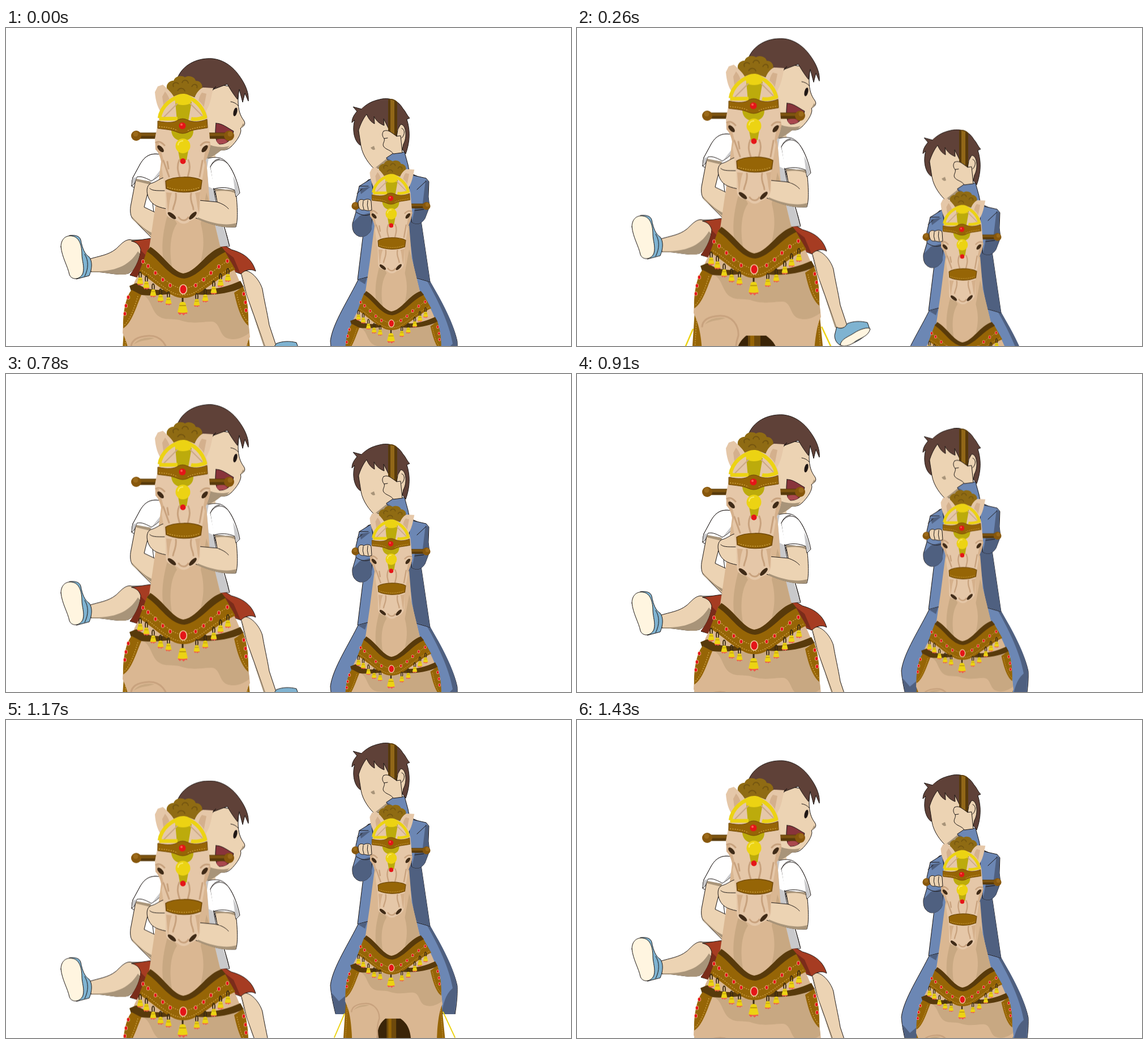
These frames come from a looping animation (998 px wide and 561 px high, 1.56 s). An HTML page:

```html
<!DOCTYPE html>
<html lang="en">
<head>
<meta charset="utf-8">
<title>Carousel</title>
<style>
html, body { margin: 0; width: 100%; height: 100%; overflow: hidden; background: #fff; }
svg { display: block; width: 998px; height: 561px; }
.ink { stroke: #1c1614; stroke-width: 1; stroke-linejoin: round; stroke-linecap: round; }
.line { fill: none; }
.skin { fill: #ecd3b3; }
.skinShade { fill: #a89479; }
.hair { fill: #5f4138; }
.shirt { fill: #fff; }
.grey { fill: #c9c9cb; }
.red { fill: #a63c22; }
.redShade { fill: #7b2c1a; }
.shoe { fill: #7fb3d1; }
.sole { fill: #fff5e0; }
.suit { fill: #6c87b4; }
.suitShade { fill: #4f6080; }
.coat { fill: #dab792; }
.coatShade { fill: #c8a882; }
.face { fill: #e5c7a8; }
.leather { fill: #966506; }
.dark { fill: #583a0b; }
.gold { fill: #ecd313; }
.olive { fill: #bcab0c; }
.gem { fill: #e51518; }
.stitch { fill: none; stroke: #d0a548; stroke-width: 1.3; stroke-dasharray: 2 2.2; }
.fold { fill: none; stroke: #c8a27e; stroke-width: 3; stroke-linecap: round; stroke-linejoin: round; }
#boy, #man { animation: 1560ms infinite; }
#boy { animation-name: boy; }
#man { animation-name: man; }
@keyframes boy {
  0% { transform: translateY(0); animation-timing-function: steps(3); }
  25% { transform: translateY(-53px); animation-timing-function: steps(6); }
  75% { transform: translateY(53.5px); animation-timing-function: steps(3); }
  100% { transform: translateY(0); }
}
@keyframes man {
  0% { transform: translateY(0); animation-timing-function: steps(3); }
  25% { transform: translateY(82px); animation-timing-function: steps(6); }
  75% { transform: translateY(-84px); animation-timing-function: steps(3); }
  100% { transform: translateY(0); }
}
</style>
</head>
<body>
<svg viewBox="0 0 998 561">
<defs>
  <g id="bell">
    <path d="M-5,9 L-3,11 L-1,9.5 L1,11.5 L3,9.5 L5,10 L4,6 L-4,6Z" fill="#f0584a"/>
    <path class="gold" d="M-3,-2 Q0,-4 3,-2 L5.5,8 Q0,9.5 -5.5,8Z"/>
    <path d="M-3.5,1 H3.5" stroke="#b08d0c"/>
  </g>
  <g id="tassel">
    <ellipse cy="-7" rx="2" ry="5.5" fill="none" stroke="#3b2b12" stroke-width="1.8"/>
    <use href="#bell"/>
  </g>
  <g id="jewel">
    <ellipse rx="3" ry="3.8" fill="#f3c8a0"/>
    <ellipse class="gem" rx="2.3" ry="3.1"/>
  </g>

  <g id="body">
    <path d="M205,566 L181,622 M432,562 L460,622" stroke="#ecd313" stroke-width="2.5"/>
    <path class="leather" d="M208,535 L202,625 L226,625 L226,540Z M428,535 L437,625 L412,625 L410,540Z"/>
    <path class="stitch" d="M211,550 L207,625 M426,550 L432,625"/>
    <path fill="#3a2408" d="M276,572 H362 V625 H276Z"/>
    <path fill="#6e4a0c" d="M302,572 H324 V625 H302Z"/>
    <path fill="#966506" d="M306,572 H313 V625 H306Z"/>
    <path class="coat" d="M274,235 L263,320 L253,388 L236,432 C220,455 208,500 206,538 C212,552 220,566 222,625 H280 C280,605 284,590 299,578 H334 C348,588 356,600 358,625 H418 C419,590 424,556 431,545 L427,510 C426,480 414,448 404,428 L379,388 L360,310 L354,235Z"/>
    <path class="coatShade" d="M288,320 C276,360 272,395 282,423 L295,430 C287,395 290,362 302,345Z"/>
    <path class="coatShade" d="M354,290 L344,345 C352,375 348,395 344,412 L379,389 L360,310Z"/>
    <path class="coatShade" d="M240,470 C254,475 255,490 264,503 C275,517 290,512 306,515 C330,524 350,517 364,518 C379,520 376,541 390,547 C406,553 420,545 430,538 L427,510 L406,460 L320,474Z"/>
    <path class="fold" d="M221,562 C222,548 236,544 252,543 C274,542 286,560 285,578 C280,592 279,604 282,622"/>
    <path class="coatShade" d="M226,558 C234,547 250,545 262,547 C254,551 238,550 226,558Z"/>
    <path class="dark" d="M218,455 L230,450 C250,464 270,463 292,461 L292,469 C268,472 242,474 222,467Z M337,461 C365,463 390,457 414,446 L420,457 C392,470 360,472 336,470Z"/>
    <path class="leather" d="M222,462 L239,471 C230,492 222,521 207,530 C206,506 211,474 222,462Z M419,456 L403,467 C408,489 415,515 428,525 C429,500 426,474 419,456Z"/>
    <path class="stitch" d="M233,473 C227,492 220,514 209,524 M408,470 C412,490 418,510 427,518"/>
    <use href="#jewel" x="216" y="475"/><use href="#jewel" x="212" y="490"/><use href="#jewel" x="210" y="504"/>
    <use href="#jewel" x="420" y="469"/><use href="#jewel" x="423" y="484"/><use href="#jewel" x="424" y="498"/>
    <path class="leather" d="M250,391 L235,431 C252,440 274,462 293,471 C305,478 322,478 334,471 C357,459 380,437 405,426 L385,391 C360,404 342,437 312,440 C288,439 270,405 250,391Z"/>
    <path class="dark" d="M255,386 L249,394 C273,410 289,441 315,442 C342,438 360,407 388,395 L381,386 C353,395 337,430 313,433 C293,429 278,400 255,386Z"/>
    <path class="stitch" d="M242,412 C262,424 286,457 313,460 C341,457 364,426 392,411"/>
    <path class="stitch" d="M240,428 C258,437 278,460 297,468 C307,472 320,472 330,468 C353,456 375,433 400,423"/>
    <use href="#jewel" x="242" y="412"/><use href="#jewel" x="251" y="420"/><use href="#jewel" x="264" y="432"/><use href="#jewel" x="277" y="444"/><use href="#jewel" x="290" y="454"/>
    <use href="#jewel" x="335" y="454"/><use href="#jewel" x="349" y="444"/><use href="#jewel" x="362" y="432"/><use href="#jewel" x="376" y="421"/><use href="#jewel" x="391" y="411"/>
    <use href="#jewel" transform="translate(313 461) scale(2.4)"/>
    <use href="#tassel" x="237" y="443"/><use href="#tassel" x="248" y="450"/><use href="#tassel" x="260" y="464"/><use href="#tassel" x="273" y="473"/><use href="#tassel" x="287" y="478"/>
    <use href="#tassel" x="337" y="481"/><use href="#tassel" x="352" y="473"/><use href="#tassel" x="367" y="459"/><use href="#tassel" x="379" y="446"/><use href="#tassel" x="392" y="437"/>
    <path d="M312,476 V486" stroke="#3b2b12" stroke-width="3"/>
    <use href="#bell" transform="translate(312 488) scale(1.65)"/>
  </g>

  <g id="head">
    <path d="M235,190 H392" stroke="#583a0b" stroke-width="11"/>
    <path d="M235,188 H392" stroke="#7d5410" stroke-width="5"/>
    <circle cx="230" cy="190" r="9" fill="#87570c"/><circle cx="394" cy="190" r="9" fill="#87570c"/>
    <circle cx="229" cy="187" r="4.5" fill="#9c6a19"/><circle cx="396" cy="187" r="4.5" fill="#9c6a19"/>
    <path fill="#8f6b13" d="M287,112 C279,102 288,92 296,93 C299,84 311,83 316,87 C324,82 334,87 335,93 C345,93 351,104 343,112 C342,121 330,124 316,122 C298,126 288,120 287,112Z"/>
    <path fill="none" stroke="#755610" stroke-width="2" d="M296,104 C292,96 302,94 305,99 M311,97 C312,90 322,91 322,98 M328,104 C331,96 340,100 337,106 M303,111 C307,104 315,106 316,112"/>
    <path class="face" d="M263,113 L268,103 L277,100 C284,106 292,113 297,122 L276,152 C268,142 264,128 263,113Z M366,106 L348,105 C341,108 336,115 333,123 L350,151 C360,139 362,125 366,106Z"/>
    <path fill="#d4b08d" d="M276,121 L281,112 C286,118 289,124 290,131 L279,143Z M354,116 L346,114 C342,119 340,125 340,131 L349,142Z"/>
    <path class="face" d="M312,117 C290,118 276,134 271,155 L263,195 L264,214 C272,222 275,235 275,246 L281,287 C283,305 281,315 283,328 C286,337 298,336 304,341 C312,349 322,344 325,340 C335,338 343,330 343,318 L343,289 L351,242 C352,232 358,225 361,207 L357,160 C352,132 334,118 312,117Z"/>
    <path fill="#d5b08b" d="M283,290 L293,291 C288,304 288,318 286,327Z M343,289 L334,291 C338,304 337,318 341,325Z M264,200 L270,203 L278,232 L275,246 C275,235 272,222 264,214Z M361,203 L353,210 L349,232 L351,242 C352,232 358,225 361,207Z"/>
    <path class="fold" d="M278,234 L288,262 M285,236 L287,248 M347,234 L342,262 M306,233 C301,244 304,254 307,263 M322,233 C327,244 323,254 321,263 M300,292 C302,305 296,312 295,320 M327,292 C324,306 331,312 331,320 M305,334 C310,341 318,341 322,334 M265,202 Q272,198 280,207 M359,202 Q351,199 344,207"/>
    <g fill="#402b17">
      <ellipse rx="7.5" ry="3.7" transform="translate(273 213) rotate(46)"/>
      <ellipse rx="7.5" ry="3.7" transform="translate(351 213) rotate(-50)"/>
      <ellipse rx="9" ry="3.6" transform="translate(293 331) rotate(38)"/>
      <ellipse rx="9" ry="3.6" transform="translate(330 331) rotate(-45)"/>
    </g>
    <path class="olive" d="M299,130 H328 L322,164 H302Z"/>
    <path d="M271,159 C274,138 294,121 312,121 C332,121 348,140 352,157 C343,160 334,162 327,160 M271,160 L303,160" fill="none" stroke="#ecd313" stroke-width="6.5" stroke-linejoin="round"/>
    <path class="gold" d="M297,124 C300,114 324,113 328,124 L326,133 C318,137 307,137 300,133Z"/>
    <path d="M303,133 L279,157 M325,133 L347,155" stroke="#cba887" stroke-width="2"/>
    <path class="olive" d="M292,181 H331 C331,193 323,199 312,199 C301,199 293,193 292,181Z"/>
    <path class="leather" stroke="#6f4808" d="M268,164 C285,168 298,167 304,162 Q312,158 320,162 C330,167 343,166 355,161 L356,176 C341,179 329,179 321,184 Q312,188 303,184 C292,179 281,179 268,177Z"/>
    <path class="stitch" d="M270,174 C283,175 294,176 303,181 M321,181 C330,176 343,175 354,173"/>
    <circle class="gem" cx="311.500" cy="172.500" r="6"/><circle cx="310" cy="170.500" r="2" fill="#f96052"/>
    <path class="olive" d="M304,216 H322 L319,233 H307Z"/>
    <circle class="gold" cx="312.500" cy="208" r="13"/>
    <path d="M304,207 C304,201 309,199 313,199" fill="none" stroke="#f8ea65" stroke-width="2"/>
    <circle class="gem" cx="312.500" cy="235" r="5"/>
    <path class="leather" stroke="#6f4808" stroke-width="1.500" d="M282,270 C296,261 331,261 346,269 L344,284 C326,292 300,291 283,283Z"/>
    <path class="stitch" d="M285,281 C302,287 325,288 342,281"/>
  </g>
  <clipPath id="cut"><path d="M560,100 H810 V603 H560Z"/></clipPath>
</defs>

<g id="boy">
  <!-- legs -->
  <path class="skin ink" d="M238,374 L222,374 C211,371 203,382 194,390 C180,401 165,402 146,408 L150,430 C175,429 197,438 216,433 C228,427 238,412 240,396Z"/>
  <path class="skinShade" d="M152,429 C185,430 215,424 233,394 L238,400 C234,418 224,433 210,435 C190,436 171,429 152,431Z"/>
  <path class="red ink" d="M222,376 L256,371 L250,445 L219,436 C231,420 237,405 238,391 C235,381 229,378 222,376Z"/>
  <path class="redShade" d="M238,392 C236,408 229,423 219,435 L240,444 L246,400Z"/>
  <path class="shoe ink" d="M112,366 C121,365 130,366 132,374 C135,389 139,399 147,404 C153,412 152,425 147,437 L124,443 L112,380Z"/>
  <path class="line ink" d="M139,399 C146,410 146,424 139,438"/>
  <path class="sole ink" d="M97,386 C97,372 106,365 117,367 C130,369 134,385 134,399 C134,410 139,421 136,432 C132,444 116,446 112,435 C109,420 99,405 97,386Z"/>
  <path class="skin ink" d="M415,430 C428,421 448,443 453,461 C456,480 461,500 465,524 L478,563 L459,566 L424,468Z"/>
  <path class="skinShade" d="M416,432 C422,448 427,482 437,507 L459,564 L456,564 L424,468Z"/>
  <path class="shoe ink" d="M459,563 C466,568 475,563 477,557 C488,552 502,552 513,555 L517,566 C508,585 485,594 469,596 C459,594 455,585 455,578Z"/>
  <path class="sole ink" d="M465,594 C467,583 480,580 490,573 C499,567 514,562 518,566 C515,579 501,582 492,588 C483,596 469,599 465,594Z"/>
  <path class="red ink" d="M374,376 L398,391 C420,397 435,408 441,429 C433,424 421,427 415,434 L390,425Z"/>
  <path class="redShade" d="M380,388 L402,405 L414,433 L400,425Z"/>

  <!-- neck and shirt -->
  <path class="skin" d="M340,190 H370 V245 H335Z"/>
  <path class="skinShade" d="M345,208 L382,214 C373,222 363,229 353,231Z"/>
  <path class="shirt ink" d="M272,223 C252,219 243,230 237,240 L224,264 Q222,271 222,279 L258,300 L268,385 L395,385 L367,284 L412,292 C410,275 402,252 393,241 C382,226 370,227 357,230 L350,238Z"/>
  <path class="grey" d="M349,231 L358,230 L355,247 L358,280 L366,284 C369,320 387,355 394,384 L379,386 C369,370 361,340 360,310Z"/>
  <path class="line ink" d="M360,249 C362,239 369,231 377,231 M367,284 C369,315 388,350 394,382"/>

  <!-- far arm -->
  <path class="skin ink" d="M229,268 L220,315 C219,325 220,332 224,337 L257,370 L266,368 L265,326 L244,316 L255,272Z"/>
  <path class="skinShade" d="M222,332 C235,347 250,359 262,363 L260,370 L224,338Z M230,266 L229,270 L254,276 L256,271Z"/>
  <path class="shirt" d="M274,224 H262 L245,235 L257,271 L274,258Z"/>
  <path class="shirt ink" d="M272,223 C252,219 243,230 237,240 L224,264 Q222,271 222,279 L227,274 L231,263 C240,260 251,267 257,270 Q267,264 274,257"/>
  <path class="grey" d="M224,265 L222,277 L227,273 L231,263Z M258,269 L273,257 V250Z"/>

  <!-- head -->
  <path class="skin ink" d="M340,95 L411,105 L410,128 C410,145 414,155 420,163 C424,169 421,173 414,177 C417,182 412,195 398,209 Q390,217 379,215 L350,206Z"/>
  <path class="skinShade" d="M352,203 C367,210 382,212 395,208 L388,215 Q379,218 352,208Z M414,177 L419,168 Q423,172 414,177Z"/>
  <path class="hair ink" d="M303,88 C311,67 335,52 365,54 C390,57 407,74 419,95 C427,109 429,121 428,129 L422,115 L418,131 L412,108 L409,126 C403,119 396,108 391,99 L364,109 L371,103 L360,116 L340,125 L305,110Z"/>
  <path class="line ink" d="M397,130 Q405,131 410,137"/>
  <ellipse cx="405" cy="148" rx="3.200" ry="7.800" fill="#201715" transform="rotate(14 405 148)"/>
  <path fill="#88343b" class="ink" d="M371,168 C382,168 391,176 402,182 C399,197 391,205 377,205 C369,200 369,185 371,168Z"/>
  <path fill="#a9484e" d="M371,199 C379,194 385,193 391,201 C386,205 380,205 375,204Z"/>

  <use href="#body"/>

  <!-- near arm -->
  <path class="skin ink" d="M282,263 C271,265 266,272 256,274 C247,278 248,291 252,300 C258,313 270,317 290,320 L335,335 C360,346 384,353 406,351 C410,340 409,315 406,287 L369,284 L373,307 L330,303Z"/>
  <path class="skinShade" d="M339,334 C361,344 388,350 407,344 L406,351 C385,354 360,347 338,337Z M369,284 L405,286 L406,292 C394,286 380,287 370,288Z"/>
  <path class="line ink" d="M254,283 C258,287 265,287 280,287 M373,307 C382,310 389,314 393,319"/>
  <path class="shirt ink" d="M361,245 C368,231 382,228 393,241 C403,255 410,275 413,291 L406,298 L404,286 C393,281 379,280 367,284Z"/>
  <path class="grey" d="M401,261 C407,272 410,281 412,291 L406,296 L404,285Z"/>
  <path class="shirt" d="M361,246 L368,283 L358,279 L357,245Z"/>

  <use href="#head"/>
</g>

<g id="man">
  <g clip-path="url(#cut)">
    <path class="suit ink" d="M624,440 C606,478 577,520 573,552 C574,570 579,590 584,610 H792 C795,593 798,570 797,553 C790,518 763,474 746,442Z"/>
    <path class="suitShade" d="M574,564 L588,580 L605,566 L602,610 H584Z M748,445 C770,482 791,520 797,554 L792,610 H768 C773,580 777,568 789,557 C783,522 764,482 744,447Z"/>
    <path class="suit ink" d="M640,268 L627,280 L632,355 L621,444 L640,439 L725,441 L749,448 L733,340 L745,270 L712,255Z"/>
    <path class="suitShade" d="M708,335 L733,340 L749,448 L723,439Z M621,444 L638,440 L634,452Z"/>
  </g>

  <path class="suit ink" d="M645,266 L624,279 L618,305 L618,325 L612,345 C611,357 615,365 625,368 C637,369 643,361 645,355 L650,300Z"/>
  <path class="suitShade" d="M613,343 L625,331 L646,325 V354 C642,364 635,369 626,368 C616,365 611,357 613,343Z M625,283 L644,280 L627,293Z"/>
  <path class="line ink" d="M624,279 L640,279 M620,292 L629,284 M619,325 C629,332 639,332 646,327"/>
  <path class="suit ink" d="M711,258 L742,265 L747,271 L746,298 L748,315 L740,336 C734,345 727,348 717,343Z"/>
  <path class="suitShade" d="M741,268 L746,271 V298 L748,315 L740,336 C734,345 727,348 717,343 L722,318 L736,310Z"/>
  <path class="line ink" d="M726,285 L742,270 M722,322 L738,320"/>

  <path class="hair ink" d="M628,143 L613,139 L620,147 C613,155 611,161 611,167 L616,162 C611,180 615,200 626,207 L645,190 L690,200 L706,222 C714,200 714,180 708,161 L713,159 C708,154 706,147 701,142 C692,126 675,122 660,126 C646,129 637,134 628,143Z"/>
  <path class="skin ink" d="M622,176 L627,208 C630,226 643,242 651,249 L695,238 L702,205 C709,193 707,170 697,170 L692,179 L680,145 L638,148Z"/>
  <path class="hair" d="M616,162 L622,183 C626,169 631,160 637,152 C640,160 645,166 651,169 L650,156 C654,164 660,169 668,172 L667,160 L676,178 L688,183 L693,179 L697,150 L670,130 L630,140Z"/>
  <path class="line ink" d="M622,183 C626,169 631,160 637,152 C640,160 645,166 651,169 L650,156 C654,164 660,169 668,172 L667,160 L676,178 M699,177 C705,179 705,188 699,194"/>
  <path class="skinShade" d="M644,211 L650,208 L652,214 Q648,217 644,211Z M651,247 C665,238 675,225 690,222 L697,236 L655,248Z"/>

  <path fill="#583a0b" d="M675,126 Q683,123 691,130 V198 H675Z"/>
  <path fill="#916718" d="M679,126 L686,128 V198 H679Z"/>
  <path class="suit ink" d="M672,229 L684,221 L704,219 L710,241 L716,270 L665,265 L677,237Z"/>
  <path class="suitShade" d="M672,229 L681,234 L673,242 L681,262 L665,265 L677,237Z"/>
  <path class="skin ink" d="M667,182 C674,178 680,184 690,191 L697,190 L700,220 L684,222 C680,215 671,215 667,209 C664,204 670,200 668,195 C664,191 664,185 667,182Z"/>
  <path class="line ink" d="M690,191 L692,180 M668,195 L674,194"/>

  <g transform="translate(680 314) scale(.765) translate(-312 -190)">
    <use href="#body"/>
    <use href="#head"/>
  </g>

  <path class="skin ink" d="M622,307 C624,301 630,302 632,304 C636,301 644,301 645,306 L646,321 C640,324 635,321 632,321 C627,322 622,320 622,307Z"/>
  <path class="line ink" d="M631,305 Q629,313 632,320 M639,304 Q637,312 640,321"/>
</g>
</svg>
</body>
</html>
```
